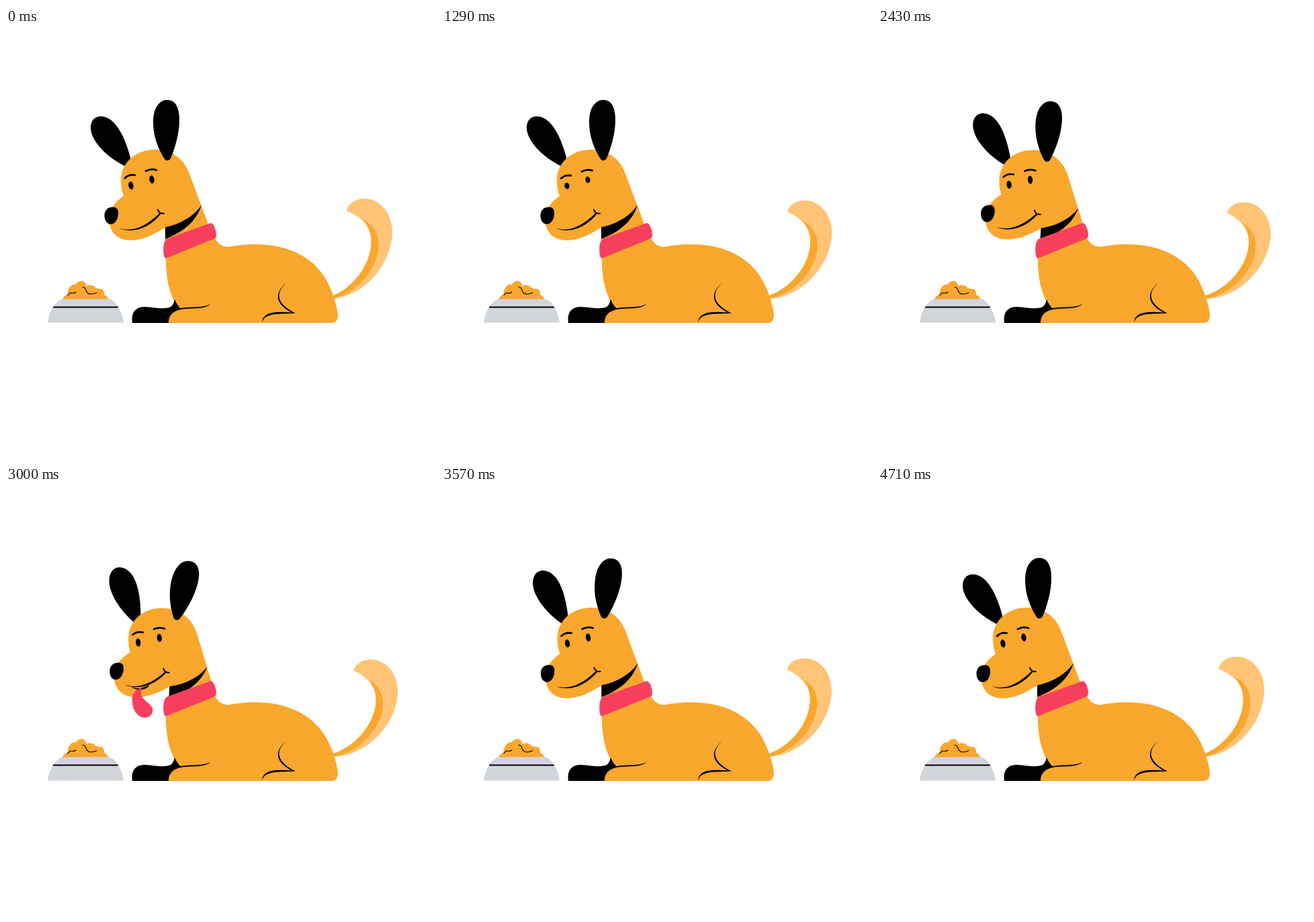
Recreate the animation shown at these times as an HTML page. Size 640 px wide and 640 px high, loop 4.78 s.

```html
<!DOCTYPE html>
<html lang="en">
<head>
<meta charset="utf-8">
<title>Dog waiting by its bowl</title>
<style>
  html, body { margin: 0; height: 100%; overflow: hidden; background: #fff; }
  svg { display: block; width: 100%; height: 100%; }
  .fur { fill: #f9a72d; }
  .pale { fill: #ffc475; }
  .pink { fill: #f73f5d; }
  .line { fill: none; stroke: #000; stroke-width: 2; stroke-linecap: round; stroke-linejoin: round; }
</style>
</head>
<body>
<svg viewBox="0 0 640 640">
  <g id="bowl">
    <path class="fur" d="M84 404 Q85 399 92 396 Q91 391 95 386 Q97 381 104 381.500 Q108 376 113 376.500 Q118 377 120 384 Q126 381 131 384.500 Q134 389 144 388.500 Q144 392 146.500 393 Q144 397 151 400 L152 404Z"/>
    <path class="line" style="stroke-width:1.100" d="M92 398 Q95 393.500 98 394.500 T104 393 M114 385.500 Q118 386 119 390 Q121 396 126 396 T135 394"/>
    <path fill="#d2d3de" d="M83 403.500 H155 Q163 408 167 415 H70 Q75 408 83 403.500Z"/>
    <path fill="#d2d6db" d="M70 415 H167 Q174 427 175 438.500 H62 Q63 427 70 415Z"/>
    <path class="line" style="stroke-width:2.200" d="M71 415.500 H166"/>
  </g>

  <g id="tail">
    <path class="pale" d="M507 271 C510 261 520 254 534 254 C557 254 575 276 575 304 C574 350 536 398 487 403 L485 399 C515 388 545 352 543.500 315 C543 299 534 284 510 273.500 Q506 273 507 271Z"/>
    <path class="fur" d="M530 285 C546 291 555 305 554.500 325 C553 358 522 396 486 403 L485 399 C515 388 545 352 543.500 315 C543 302 537 291 530 285Z"/>
  </g>

  <path class="fur" d="M238 335 C237 368 242 392 252 409 L262 418 C247 421 242 428 242 439 H486 C491 439 494 434 494 427 C493 416 489 403 486 395 C468 344 425 322 370 322 C354 322 340 324 333 325.500 C322 327 314 320 311 312Z"/>
  <path d="M188 439 L187.500 433 C188 420 196 415 206 415 C222 416 234 419 244 415.500 C249 413 250 408 251 404 Q254 412 260 417 C274 414 292 417.500 304 411 C296 419 278 416.500 262 418.500 C248 421 242 428 242 439Z"/>
  <path d="M417 379.500 C398 397 406 412 431 424.500 C408 426 385 423 381 438.500 C382 421 405 422 425 423.500 C403 412 397 396 417 379.500Z"/>

  <g id="head">
    <path id="leftEar" d="M180 207 C150 193 126 168 126 148 C126 138 132 131.500 141 131.500 C163 131.500 178 163 187 200 L186 208Z"/>
    <path class="fur" d="M303 297 L273 217 C265 195 247 181 222 181 C192 181 171 201 171 227 C171 237 173 244 175 250 C163 258 154 270 153 283 C154 305 166 316 186 316 C207 316 225 304 237 297 V322 L302 305Z"/>
    <path d="M237 296.500 C260 292 281 279 291 263.500 C284 287 264 304 237 314Z"/>
    <path id="rightEar" d="M236 195 C227 181 219 162 219 140 C219 119 228 107 240 107 C252 107 258 118 258 137 C258 158 251 180 245 194 C243 198 238 198 236 195Z"/>
    <path id="brows" class="line" style="stroke-width:2.700" d="M177 223.500 Q183 217.500 192 219 M208 213 Q216 208.800 224 211.500"/>
    <ellipse id="leftEye" rx="3.600" ry="6"/>
    <ellipse id="rightEye" rx="3.600" ry="6"/>
    <path d="M146.500 279 C146.500 271 152 266.500 159 266.500 C165 266.500 167 270 167 276 C167 285 162 292 156 292 C150 292 146.500 286 146.500 279Z"/>
    <g id="tongue">
      <path d="M180 301 C190 304 198 302 207 296 L204 301 Q192 308 180 301Z"/>
      <path class="pink" d="M183 313 Q187 304 196 301 C194 307 195 312 198 316 C203 322 214 326 214.500 334 C214 341 209 345.500 202 345.500 C189 345 181 328 183 313Z"/>
    </g>
    <path d="M169 298 C188 304 208 296 228.500 275.500 L230.500 277 C212 299 188 306 169 298Z"/>
    <path class="line" d="M226 270.500 Q228 277 235 276"/>
  </g>

  <path class="pink" d="M239 314 L304 290.500 C308 289 313 299 313 309 Q313 312.500 309 314 L240 342 Q236 343.500 235 339 C233 328 235 317 239 314Z"/>
</svg>

<script>
const LOOP = 4780;

function place(id, transform) {
  document.getElementById(id).setAttribute('transform', transform);
}

// Smooth step from 0 to 1 between two times
function ramp(t, from, to) {
  const x = Math.min(1, Math.max(0, (t - from) / (to - from)));
  return x * x * (3 - 2 * x);
}

// Rise during a..b, fall back during c..d
const pulse = (t, a, b, c, d) => ramp(t, a, b) - ramp(t, c, d);

function draw(now) {
  const t = now % LOOP;
  const wag = (1 - Math.cos(2 * Math.PI * t / LOOP)) / 2;
  const nod = pulse(t, 1830, 2630, 3050, 3660);
  const flick = 10.4 * pulse(t, 2280, 3000, 3350, 4080);
  const twitch = 0.4 * pulse(t, 70, 300, 300, 570);
  const lick = pulse(t, 2700, 2950, 3150, 3450);
  const blink = pulse(t, 1230, 1430, 1430, 1640);
  const lid = `rotate(-10) scale(1 ${1 - 0.9 * blink})`;

  place('tail', `rotate(${5.7 * wag} 487 402)`);
  place('head', `rotate(${3.85 * nod} 214 394)`);
  place('leftEar', `rotate(${flick + twitch} 184 204)`);
  place('rightEar', `rotate(${flick} 240 196)`);
  place('brows', `translate(0 ${3 * blink})`);
  place('leftEye', `translate(186 ${234.5 + 2 * blink}) ${lid}`);
  place('rightEye', `translate(217 ${225.5 + 2 * blink}) ${lid}`);
  place('tongue', `translate(191 302) scale(${lick}) translate(-191 -302)`);
  requestAnimationFrame(draw);
}

draw(0);
</script>
</body>
</html>
```
